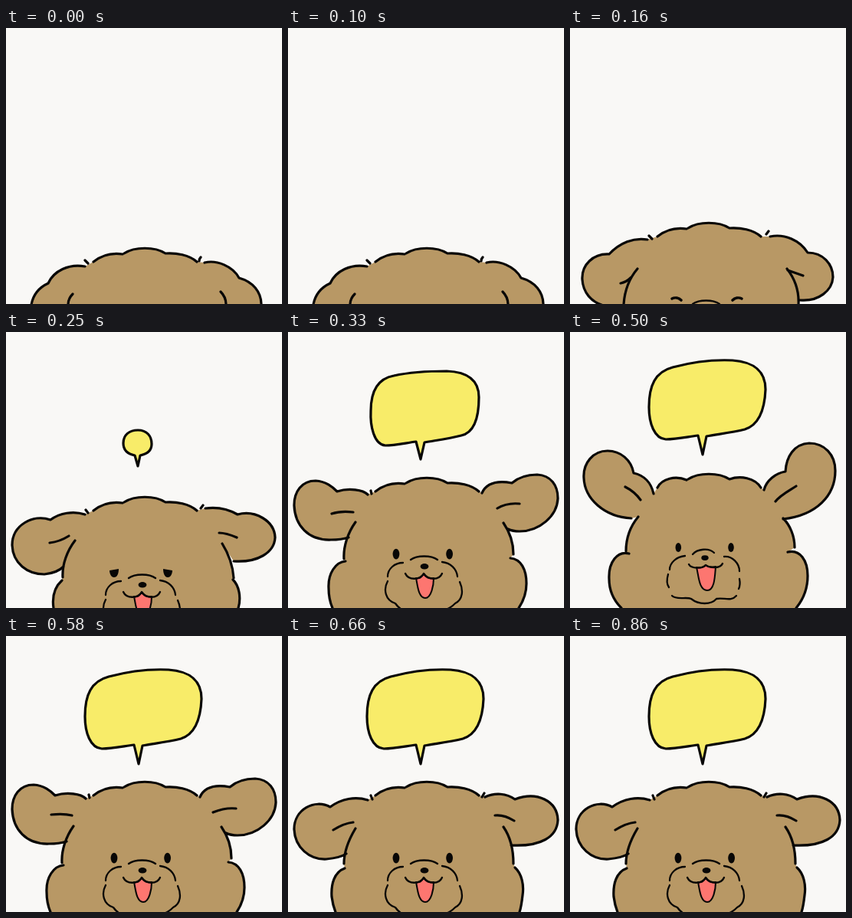
Animation of 360 by 360 pixels, one loop 1000 ms. Source, as an HTML page:

```html
<!DOCTYPE html>
<html lang="en">
<head>
<meta charset="utf-8">
<title>Puppy pops up</title>
<style>
  html, body { margin: 0; width: 100%; height: 100%; overflow: hidden; background: #f9f8f6; }
  svg { display: block; width: 100%; height: 100%; }
</style>
</head>
<body>
<svg id="stage" viewBox="0 0 360 360" fill="none" stroke="#080706" stroke-width="3.2"
     stroke-linecap="round" stroke-linejoin="round"></svg>
<script>
const TAN = '#b89865', YELLOW = '#f8ec69', PINK = '#fd7670', INK = '#080706';
const LOOP = 1000;
const stage = document.getElementById('stage');

const path = (d, attrs = '') => `<path d="${d}" ${attrs}/>`;
const shift = (y, body) => `<g transform="translate(0 ${y})">${body}</g>`;
const oval = (x, y, rx, ry) =>
  `<ellipse cx="${x}" cy="${y}" rx="${rx}" ry="${ry}" fill="${INK}" stroke="none"/>`;

// Curly fringe, moved vertically with the head; puff rounds the outer curls
const fringe = (y, puff = 0) =>
  `M114 ${208 + y}C${124 - puff} ${200 + y - puff} 138 ${196 + y - puff} 152 ${198 + y}` +
  `M154 ${197 + y}C168 ${188 + y} 194 ${188 + y} 208 ${197 + y}` +
  `C222 ${196 + y - puff} ${239 + puff / 2} ${199 + y - puff} 249 ${208 + y}`;

const eyes = {
  open: oval(141, 289.6, 4.4, 6.8) + oval(210.6, 289.6, 4.4, 6.8),
  small: oval(141.3, 281, 3.8, 5.9) + oval(210, 281, 3.8, 5.9),
  half: path('M135 287L147 285C147 293 144 296 141 296C137 296 135 291 135 287Z' +
    'M205 285L217 287C217 291 215 296 211 296C207 296 205 291 205 285Z',
    `fill="${INK}" stroke="none"`),
  low: path('M133 290C137 288 142 289 145 292M212 292C215 289 220 288 224 290', 'stroke-width="3.6"')
};

const smile = {
  nose: oval(178, 305.8, 5.4, 3.7),
  muzzle: 'M160 297C168 291 187 291 195 297' +
    'M150 301C139 301 130 309 130 319M130 325C124 336 127 350 140 354C142 357 144 359 147 361' +
    'M201 300C212 301 220 309 221 319M224 326C229 337 228 349 218 354C214 358 211 360 208 361',
  mouth: 'M153 315C157 324 172 324 177 315C183 324 197 324 201 315',
  tongue: 'M167 321C169 330 170 347 179 347C187 347 190 330 190 321C183 322 180 320 177 316C174 320 172 322 167 321Z'
};
const laugh = {
  nose: oval(176, 294.6, 4.7, 3.4),
  muzzle: 'M160 290C166 283 181 281 188 288' +
    'M150 292C139 293 130 301 130 310M128 316C126 323 126 329 129 333' +
    'M133 344C139 350 152 345 158 348C168 356 184 356 191 348C201 346 210 352 217 344' +
    'M201 293C212 292 221 302 221 312M221 322C222 327 222 331 220 335',
  mouth: 'M155 303C158 309 173 309 177 304C181 308 196 309 199 302',
  tongue: 'M165 307C168 318 168 337 179 337C189 337 189 317 190 306C184 307 180 306 177 304C174 307 170 308 165 307Z'
};

const face = ({ y = 0, look = 'open', style = smile }) => shift(y,
  eyes[look] +
  path(style.muzzle, 'stroke-width="2.3"') +
  path(style.tongue, `fill="${PINK}" stroke-width="2"`) +
  path(style.mouth, 'stroke-width="2.4"') +
  style.nose);

const bubbles = {
  drop: 'M168 161C158 159 153 154 153 145C153 134 161 128 172 128C184 128 190 136 190 146' +
    'C190 154 185 159 175 161L172 175Z',
  tilt: 'M167 143C152 145 139 148 127 148C112 147 107 122 108 103C108 78 116 61 138 57' +
    'C161 52 185 51 207 51C234 52 249 63 249 85C249 110 244 131 226 135C210 139 195 141 178 144L173 166Z',
  full: 'M167 135C152 137 139 140 125 140C110 139 103 119 103 98C103 70 111 52 134 46' +
    'C160 39 190 36 212 37C238 39 255 49 255 75C254 99 247 121 228 127C212 131 195 133 178 136L173 160Z'
};

// skin: outline pieces in clockwise order; lines: strokes inside or beside it
const raised = {
  skin: [
    'M58 360C55 353 53 344 53 334C52 315 62 300 75 299',
    'M73 296C72 280 78 262 88 248',
    'M79 268C73 270 66 271 56 271C26 272 9 252 8 226C8 208 18 194 36 194C50 195 58 202 64 208C80 203 98 206 104 212',
    fringe(0),
    'M253 210C258 199 270 193 292 197C300 190 312 186 325 186C343 187 352 200 352 217' +
      'C351 240 328 260 302 260C296 260 291 259 287 257',
    'M281 249C290 262 294 275 294 290',
    'M290 295C304 296 311 310 311 328C311 340 307 351 301 360'
  ],
  lines: 'M108 207L109 211',
  face: {}
};

const poses = [
  {
    until: 160,
    skin: [
      'M33 361C35 350 42 339 55 333C62 317 82 307 103 311',
      fringe(97),
      'M259 306C275 302 296 311 304 326C322 331 333 344 333 361'
    ],
    lines: 'M87 347C83 351 81 355 81 361M280 344C285 349 287 354 287 361' +
      'M103 303L107 307M254 299C252 301 252 303 252 304'
  },
  {
    until: 250,
    skin: [
      'M44 362C28 358 17 345 16 328C15 309 30 294 51 295C65 280 83 273 101 276',
      fringe(64),
      'M261 272C280 268 300 277 310 293C330 293 343 308 343 325C342 342 325 357 300 355',
      'M298 361L298 361'
    ],
    lines: 'M88 314C77 327 71 344 70 361M283 314C294 328 299 342 298 361' +
      'M284 316L304 323M66 333C71 332 76 329 80 325M103 271L107 275M259 265L256 269',
    face: { y: 63, look: 'low' }
  },
  {
    until: 330,
    skin: [
      'M62 360C60 346 63 333 73 324',
      'M74 320C73 303 80 285 90 272',
      'M75 306C69 312 60 315 50 316C28 316 9 302 8 278C8 252 35 237 58 245C70 236 88 233 103 238',
      fringe(25),
      'M260 230C275 228 290 231 302 238C325 232 350 246 351 268C350 288 328 301 297 299',
      'M282 276C292 292 296 306 297 321',
      'M296 323C304 331 307 346 303 360'
    ],
    lines: 'M57 275C66 274 74 271 82 266M278 262C287 262 294 265 301 268M104 232L107 236M257 226L254 230',
    face: { y: 24, look: 'half' },
    bubble: bubbles.drop
  },
  {
    ...raised,
    until: 500,
    lines: raised.lines + 'M57 237C66 234 76 234 85 235M273 230C281 225 291 223 302 224',
    bubble: bubbles.tilt
  },
  {
    until: 580,
    skin: [
      'M67 360C57 350 51 337 51 322C50 300 62 285 77 289',
      'M73 286C73 268 79 253 89 241',
      'M80 243C45 241 19 218 18 190C17 171 30 155 49 155C66 155 80 167 83 184C97 187 106 197 109 211',
      fringe(-5, 4),
      'M253 206C256 194 268 184 281 182C282 163 292 146 312 145C332 145 346 160 346 181' +
        'C346 213 322 239 278 244',
      'M278 243C287 252 293 266 293 281',
      'M284 287C300 283 310 298 310 318C310 335 304 349 295 360'
    ],
    lines: 'M72 202C80 206 87 212 92 219M268 221C274 213 284 208 295 201',
    face: { look: 'small', style: laugh },
    bubble: bubbles.full
  },
  {
    ...raised,
    until: 660,
    lines: raised.lines + 'M59 233C69 232 78 232 86 234M270 230C280 226 290 224 300 225',
    bubble: bubbles.full, drop: 7
  },
  {
    until: LOOP,
    skin: [
      'M62 360C60 355 58 348 57 340C56 324 60 308 74 303',
      'M73 297C73 282 79 266 88 251',
      'M76 284C70 288 60 290 50 291C28 292 9 276 8 252C8 226 35 212 55 223C70 212 88 209 104 214',
      fringe(0),
      'M257 210C270 204 285 205 296 213C325 202 351 215 352 240C351 262 330 275 291 273',
      'M281 249C290 262 294 278 294 297',
      'M296 302C305 310 308 325 306 338C305 347 304 354 302 360'
    ],
    lines: 'M59 253C67 248 76 244 85 243M270 234C279 233 287 236 295 241M108 208L110 213M256 205L253 210',
    face: {},
    bubble: bubbles.full, drop: 7
  }
];

function draw(pose) {
  const edge = pose.skin.join('');
  const fill = 'M' + edge.replace(/M/g, 'L').slice(1) + 'Z';
  stage.innerHTML =
    path(fill, `fill="${TAN}" stroke="none"`) +
    path(edge + pose.lines) +
    (pose.face ? face(pose.face) : '') +
    (pose.bubble ? shift(pose.drop || 0, path(pose.bubble, `fill="${YELLOW}"`)) : '');
}

const start = performance.now();
let shown;
function tick() {
  const t = (performance.now() - start) % LOOP;
  const pose = poses.find(p => t < p.until);
  if (pose !== shown) draw(shown = pose);
  requestAnimationFrame(tick);
}
tick();
</script>
</body>
</html>
```
